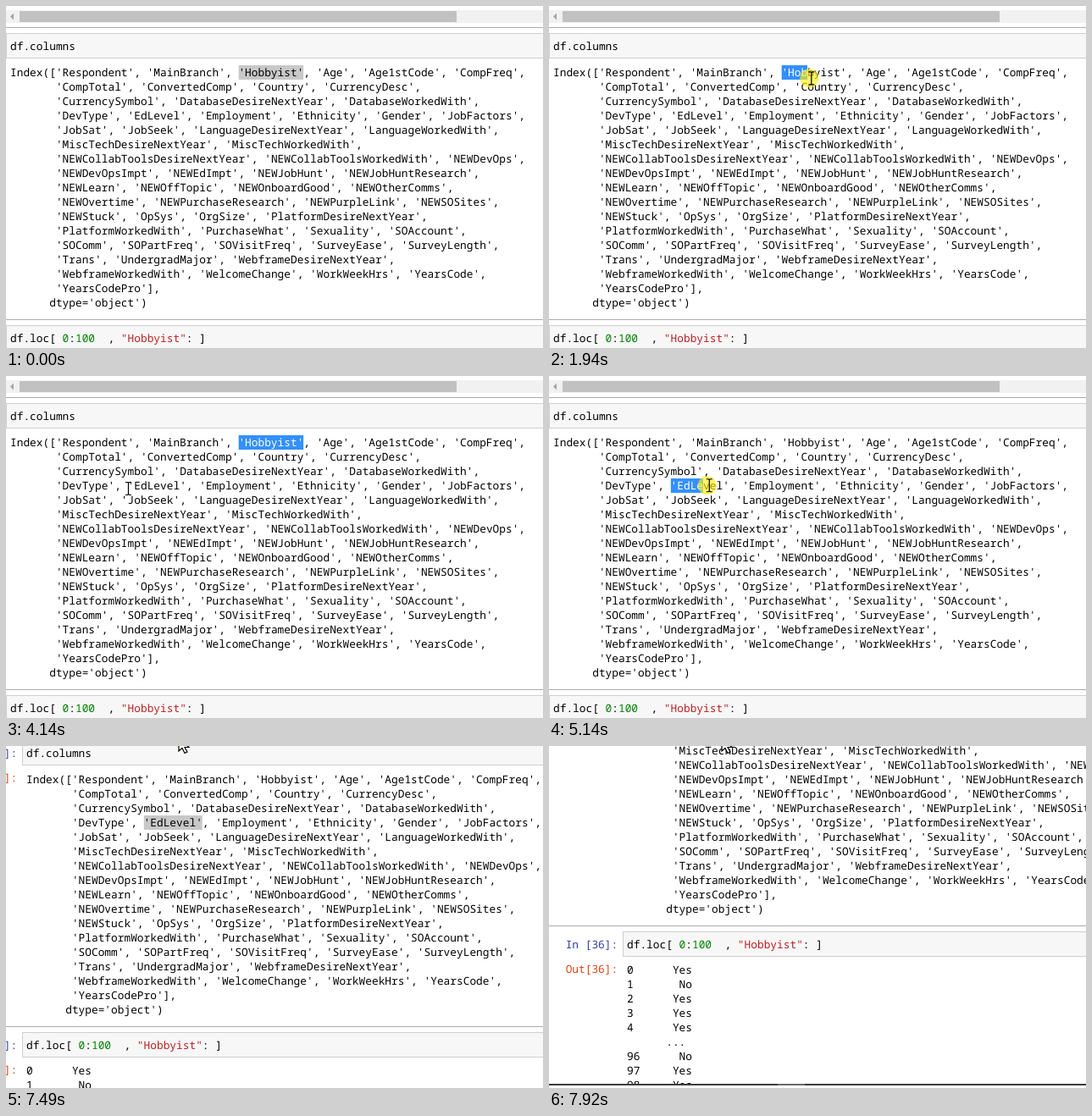
Write an HTML page with a canvas that moves like this. It is 634 px wide and 404 px high and loops after 8 s.

```html
<!DOCTYPE html>
<html lang="en">
<head>
<meta charset="utf-8">
<title>Notebook</title>
<style>
html, body { margin: 0; width: 100%; height: 100%; overflow: hidden; background: #fff; }
canvas { display: block; }
</style>
</head>
<body>
<canvas id="stage" width="634" height="404"></canvas>
<script>
const ctx = document.getElementById('stage').getContext('2d');
const LOOP = 8000, LEFT = 5, CHAR = 7.698, LINE = 17, TOP = 70;
const PAN_START = 7490, PAN_END = 7920, PAN_STEPS = 6;

const listing = `Index(['Respondent', 'MainBranch', 'Hobbyist', 'Age', 'Age1stCode', 'CompFreq',
       'CompTotal', 'ConvertedComp', 'Country', 'CurrencyDesc',
       'CurrencySymbol', 'DatabaseDesireNextYear', 'DatabaseWorkedWith',
       'DevType', 'EdLevel', 'Employment', 'Ethnicity', 'Gender', 'JobFactors',
       'JobSat', 'JobSeek', 'LanguageDesireNextYear', 'LanguageWorkedWith',
       'MiscTechDesireNextYear', 'MiscTechWorkedWith',
       'NEWCollabToolsDesireNextYear', 'NEWCollabToolsWorkedWith', 'NEWDevOps',
       'NEWDevOpsImpt', 'NEWEdImpt', 'NEWJobHunt', 'NEWJobHuntResearch',
       'NEWLearn', 'NEWOffTopic', 'NEWOnboardGood', 'NEWOtherComms',
       'NEWOvertime', 'NEWPurchaseResearch', 'NEWPurpleLink', 'NEWSOSites',
       'NEWStuck', 'OpSys', 'OrgSize', 'PlatformDesireNextYear',
       'PlatformWorkedWith', 'PurchaseWhat', 'Sexuality', 'SOAccount',
       'SOComm', 'SOPartFreq', 'SOVisitFreq', 'SurveyEase', 'SurveyLength',
       'Trans', 'UndergradMajor', 'WebframeDesireNextYear',
       'WebframeWorkedWith', 'WelcomeChange', 'WorkWeekHrs', 'YearsCode',
       'YearsCodePro'],
      dtype='object')`.split('\n');

const answers = `0      Yes
1       No
2      Yes
3      Yes
4      Yes
      ...
96      No
97     Yes
98     Yes`.split('\n');

// Each pointer move eases out to (x, y); bow bends it downwards on the way
const origin = [567, 415];
const moves = [
  { start: 0, end: 850, x: 287, y: 77 },
  { start: 930, end: 1480, x: 276, y: 76 },
  { start: 1630, end: 2780, x: 352, y: 79, bow: 16 },
  { start: 3110, end: 3980, x: 130, y: 130 },
  { start: 4060, end: 4210, x: 146, y: 134 },
  { start: 4440, end: 4830, x: 141, y: 126 },
  { start: 4900, end: 5440, x: 212, y: 131 },
  { start: 6560, end: 7220, x: 203, y: -24 },
  { start: 7480, end: PAN_START, x: 204, y: -10 }
];

// Mouse button held down, with the row and column where it goes down
const drags = [
  { start: 1480, end: 3010, row: 0, col: 35 },
  { start: 4830, end: 6160, row: 3, col: 18 }
];

const mix = (a, b, k) => a + (b - a) * k;
const easeOut = k => Math.sin(k * Math.PI / 2);

function pointerAt(t) {
  let [x, y] = origin;
  for (const m of moves) {
    if (t < m.start) break;
    const k = easeOut(Math.min(1, (t - m.start) / (m.end - m.start)));
    x = mix(x, m.x, k);
    y = mix(y, m.y, k) + (m.bow || 0) * Math.sin(Math.PI * k * k);
  }
  return [x, y];
}

function panAt(t) {
  if (t < PAN_START) return [0, 0];
  const step = Math.floor((t - PAN_START) / (PAN_END - PAN_START) * PAN_STEPS);
  const k = easeOut(Math.min(1, step / PAN_STEPS));
  return [Math.round(mix(19, 87, k)), Math.round(mix(-39, -158, k))];
}

function rect(x, y, w, h, color) {
  ctx.fillStyle = color;
  ctx.fillRect(x, y, w, h);
}

function text(str, col, baseline, color = '#000') {
  ctx.fillStyle = color;
  ctx.fillText(str, LEFT + col * CHAR, baseline);
}

function textBlock(lines, baseline, color) {
  lines.forEach((line, i) => {
    const indent = line.search(/\S/);
    text(line.slice(indent), indent, baseline + i * LINE, color);
  });
}

const drawListing = color => textBlock(listing, TOP + 13, color);

function inputCell(y, number) {
  rect(-100, y - 7, 900, 1, '#ababab');
  rect(0, y, 800, 30, '#cfcfcf');
  rect(1, y + 1, 800, 28, '#f7f7f7');
  text(`In [${number}]:`, -9.4, y + 20, '#303f9f');
  text(`Out[${number}]:`, -9.4, y + 49, '#d84315');
}

function scrollbar(hover) {
  rect(0, 5, 800, 15, '#f1f1f1');
  rect(16, 6, 516, 13, hover ? '#a8a8a8' : '#c1c1c1');
  ctx.fillStyle = '#a3a3a3';
  ctx.fill(new Path2D('M5 12.5l4-4v8z'));
}

// Selected spans as [row, first column, last column]
function selection(t) {
  const drag = drags.findLast(d => t >= d.start);
  if (!drag) return [[0, 35, 45]];
  const [x, y] = pointerAt(Math.min(t, drag.end));
  const row = Math.floor((y - TOP) / LINE);
  const col = Math.floor((x - LEFT) / CHAR + 0.3);
  if (row > drag.row) return [[drag.row, drag.col, 80], [row, 0, col]];
  return [[drag.row, drag.col, Math.max(drag.col, col)]];
}

function drawSelection(t) {
  const gray = t < drags[0].start || t >= PAN_START;
  for (const [row, from, to] of selection(t)) {
    const box = [LEFT + from * CHAR, TOP + row * LINE, (to - from) * CHAR, LINE];
    ctx.save();
    ctx.beginPath();
    ctx.rect(...box);
    ctx.clip();
    rect(...box, gray ? '#c8c8c8' : '#3390ff');
    drawListing(gray ? '#000' : '#fff');
    ctx.restore();
  }
}

function drawPointer(t) {
  const [x, y] = pointerAt(t);
  const pressed = t >= PAN_START || drags.some(d => t >= d.start && t < d.end);
  if (pressed) {
    ctx.fillStyle = 'rgba(255,236,20,.65)';
    ctx.beginPath();
    ctx.arc(x, y, 11, 0, 7);
    ctx.fill();
  }
  ctx.save();
  ctx.lineWidth = 1.2;
  ctx.strokeStyle = '#000';
  if (y > 33) {
    ctx.translate(x + 2.5, y);
    ctx.stroke(new Path2D('M-3.5-7.5h2.5l1 1 1-1h2.5M0-6.5v13M-3.5 7.5h2.5l1-1 1 1h2.5'));
  } else {
    const arrow = new Path2D('M0 0v16l4-3.5 3 6 3-1.5-3-5.5h5z');
    ctx.translate(x, y);
    ctx.fillStyle = '#fff';
    ctx.fill(arrow);
    ctx.stroke(arrow);
  }
  ctx.restore();
}

function draw(t) {
  const pointerY = pointerAt(t)[1];
  rect(0, 0, 634, 404, '#fff');
  ctx.font = '12.83px "Noto Sans Mono", monospace';
  ctx.textRendering = 'geometricPrecision';
  ctx.save();
  ctx.translate(...panAt(t));
  scrollbar(pointerY > 5 && pointerY < 20);
  inputCell(32, 35);
  text('df.columns', 0, 52);
  drawListing();
  drawSelection(t);
  inputCell(377, 36);
  text('df.loc[  :     ,           : ]', 0, 397);
  text('0', 8, 397, '#008000');
  text('100', 10, 397, '#008000');
  text('"Hobbyist"', 17, 397, '#ba2121');
  answers.forEach((line, i) => text(line, 0, 427 + i * LINE));
  rect(-100, 557, 900, 2, '#3c3c3c');
  rect(183, 557, 32, 2, '#6a6a6a');
  rect(-100, 559, 900, 40, '#fff');
  ctx.restore();
  drawPointer(t);
}

const start = performance.now();
function tick() {
  draw((performance.now() - start) % LOOP);
  requestAnimationFrame(tick);
}
tick();
</script>
</body>
</html>
```
